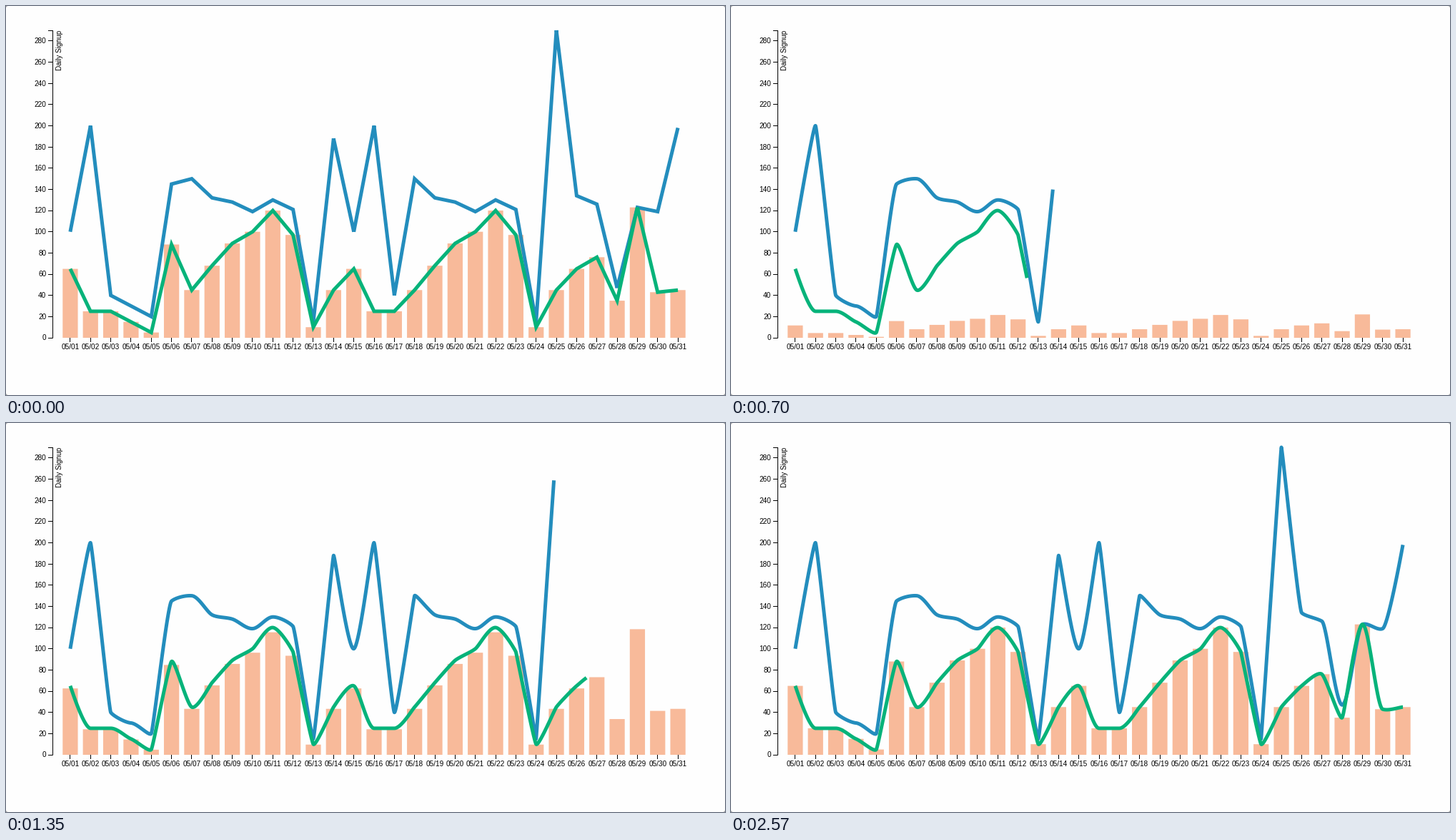
A matplotlib script for the animation above (2.62 s loop, 1006 px wide and 544 px high).

```python
import numpy as np
import matplotlib.pyplot as plt
from matplotlib.animation import FuncAnimation
from matplotlib.collections import LineCollection
from matplotlib.patches import FancyBboxPatch

W, H, DPI = 1006, 544, 64
PX = 72 / DPI                      # points per pixel
LOOP, INTERVAL = 2620, 20
STEP, LAST = 43.49, 59             # screen refresh of the chart, in ms
START, DURATION = 163, 1500

LEFT, TOP, BASE = 65.5, 34, 464
MAX = 290
FIRST, BAND, BAR = 89.9, 28.34, 21.25
BLUE, GREEN, SALMON = "#238dbd", "#06b37a", "#f8ba9a"
MITER_LIMIT = 4

visits = [100, 200, 40, 30, 20, 145, 150, 132, 128, 119, 130, 121, 15, 188,
          100, 200, 40, 150, 132, 128, 119, 130, 121, 15, 290, 134, 126, 47,
          123, 119, 198]
signups = [65, 25, 25, 15, 5, 88, 45, 68, 89, 100, 120, 97, 10, 45, 65, 25,
           25, 45, 68, 89, 100, 120, 97, 10, 45, 65, 76, 35, 123, 43, 45]

plt.rcParams["path.simplify"] = False
plt.rcParams["font.family"] = "Liberation Sans"


def y_of(value):
    return BASE - np.asarray(value, float) * (BASE - TOP) / MAX


def crisp(v):
    return np.floor(v) + 0.5


days = FIRST + BAND * np.arange(len(signups))


def tangents(y):
    """Monotone tangent vectors, shortened where the slope is steep."""
    d = np.diff(y) / BAND
    m = np.concatenate([d[:1], (d[:-1] + d[1:]) / 2, d[-1:]])
    for i, slope in enumerate(d):
        if abs(slope) < 1e-6:
            m[i] = m[i + 1] = 0
            continue
        size = np.hypot(m[i] / slope, m[i + 1] / slope)
        if size > 3:
            m[i:i + 2] *= 3 / size
    span = np.full(len(y), 2 * BAND)
    span[[0, -1]] = BAND
    s = span / (6 * (1 + m * m))
    return np.column_stack([s, s * m])


def smooth(y, n=32):
    """Sample the Bezier curve through the daily points."""
    p, t = np.column_stack([days, y]), tangents(y)
    u = (np.arange(n) / n)[None, :, None]
    a, b = p[:-1, None], p[1:, None]
    c1, c2 = a + t[:-1, None], b - t[1:, None]
    v = 1 - u
    curve = v**3 * a + 3 * v * v * u * c1 + 3 * v * u * u * c2 + u**3 * b
    return np.vstack([curve.reshape(-1, 2), p[-1:]]).T


def polyline(y):
    """Straight segments, split where a corner is too sharp for a miter."""
    p = np.column_stack([days, y])
    u = np.diff(p, axis=0)
    u /= np.hypot(*u.T)[:, None]
    fold = (1 + (u[:-1] * u[1:]).sum(axis=1)) / 2
    cuts = 1 + np.flatnonzero(fold < 1 / MITER_LIMIT**2)
    gap = np.full((1, 2), np.nan)
    parts, start = [], 0
    for cut in cuts:
        parts += [p[start:cut + 1], gap]
        start = cut
    return np.vstack(parts + [p[start:]]).T


def ease(p):
    return 4 * p**3 if p < 0.5 else 1 - 4 * (1 - p)**3


class Trace:
    def __init__(self, ax, values, color, z):
        y = y_of(values)
        self.corners = polyline(y)
        self.cx, self.cy = smooth(y)
        steps = np.hypot(np.diff(self.cx), np.diff(self.cy))
        self.dist = np.append(0, np.cumsum(steps))
        self.line, = ax.plot([], [], color=color, lw=5 * PX, zorder=z,
                             solid_capstyle="butt", snap=False)

    def straight(self):
        self.line.set_solid_joinstyle("miter")
        self.line.set_data(*self.corners)

    def reveal(self, p):
        end = p * self.dist[-1]
        n = np.searchsorted(self.dist, end)
        x = np.append(self.cx[:n], np.interp(end, self.dist, self.cx))
        y = np.append(self.cy[:n], np.interp(end, self.dist, self.cy))
        self.line.set_solid_joinstyle("round")
        self.line.set_data(x, y)


fig = plt.figure(figsize=(W / DPI, H / DPI), dpi=DPI, facecolor="#9c9c9c")
ax = fig.add_axes([0, 0, 1, 1])
ax.axis("off")
ax.add_patch(FancyBboxPatch((0, 0), W, H, fc="#fefefe", ec="none", zorder=0,
                            boxstyle="round,pad=0,rounding_size=3"))


def draw_axes():
    font = dict(fontsize=10 * PX, color="black", zorder=6)
    segs = [[(LEFT, TOP), (LEFT, BASE + 0.5)],
            [(59, TOP + 0.5), (LEFT, TOP + 0.5)]]
    for v in range(0, MAX, 20):
        y = float(y_of(v))
        segs.append([(59, crisp(y)), (LEFT, crisp(y))])
        ax.text(56.5, y + 3.4, str(v), ha="right", va="baseline", **font)
    for i, x in enumerate(days):
        segs.append([(crisp(x), BASE), (crisp(x), BASE + 6)])
        ax.text(x, BASE + 16, f"05/{i + 1:02d}", ha="center", va="baseline",
                **font)
    ax.text(78.5, TOP, "Daily Signup", rotation=90, rotation_mode="anchor",
            ha="right", va="baseline", **font)
    ax.add_collection(LineCollection(segs, colors="black", linewidths=PX,
                                     zorder=5, snap=False), autolim=False)


draw_axes()
heights = BASE - y_of(signups)
bars = ax.bar(days, -heights, BAR, bottom=BASE, color=SALMON, lw=0, zorder=2,
              snap=False)
traces = [Trace(ax, visits, BLUE, 3), Trace(ax, signups, GREEN, 4)]
ax.set_xlim(0, W)
ax.set_ylim(H, 0)


def update(i):
    tick = min(LAST, int((i * INTERVAL + 15) / STEP))
    p = (tick * STEP - START) / DURATION
    for trace in traces:
        if p < 0:
            trace.straight()
        else:
            trace.reveal(min(p, 1))
    grow = 1 if p < 0 else ease(min(p, 1))
    for bar, h in zip(bars, heights):
        bar.set_height(-h * grow)
    return [*bars, *(t.line for t in traces)]


anim = FuncAnimation(fig, update, frames=LOOP // INTERVAL, interval=INTERVAL,
                     init_func=lambda: update(0), repeat=True, repeat_delay=0)
plt.show()
```
